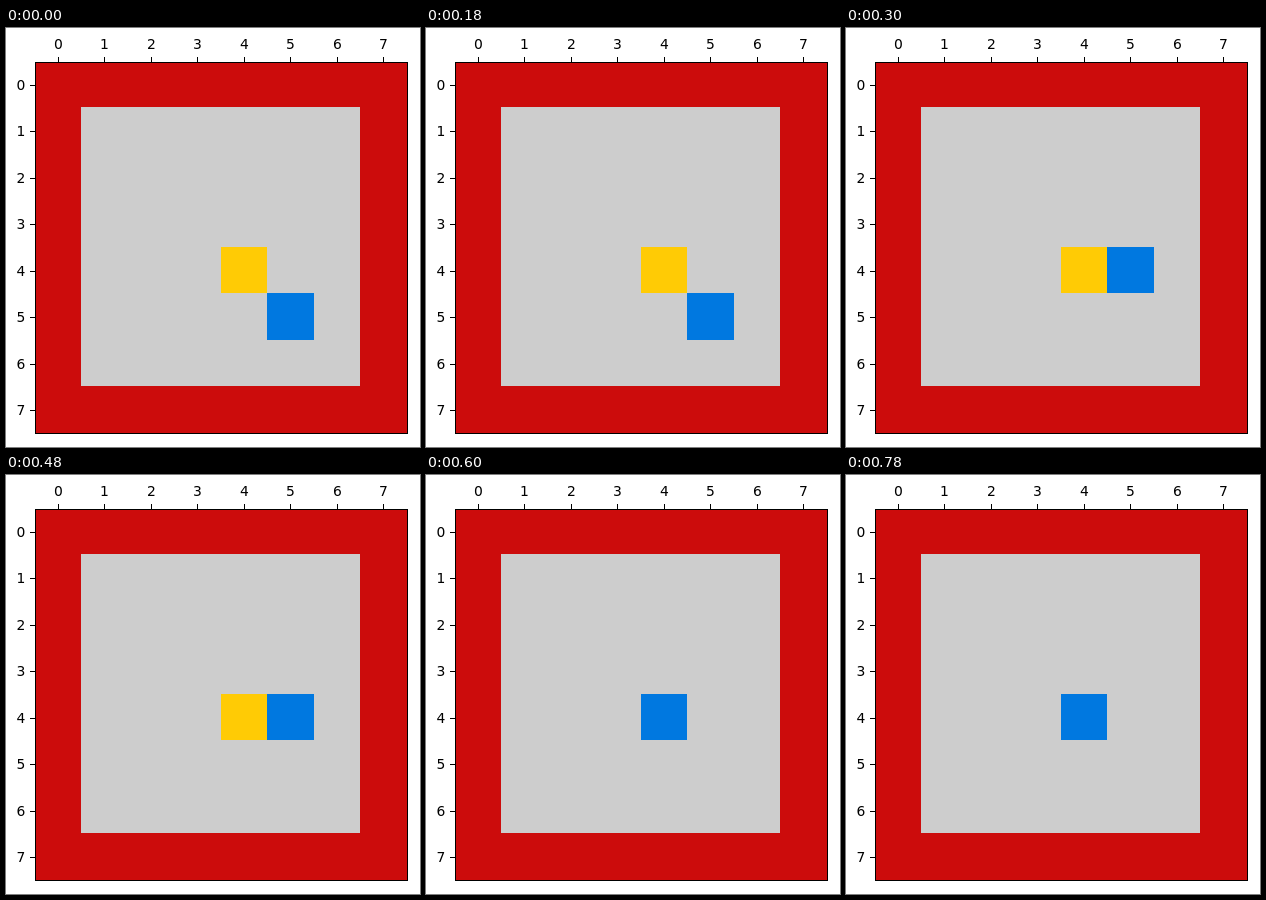
An HTML page with a canvas for the animation above (0.9 s loop, 414 by 419 pixels).

```html
<!DOCTYPE html>
<html>
<head>
<meta charset="utf-8">
<style>
  html, body { margin: 0; width: 100%; height: 100%; overflow: hidden; background: #fff; }
  canvas { display: block; }
</style>
</head>
<body>
<canvas id="stage" width="414" height="419"></canvas>
<script>
const ctx = document.getElementById('stage').getContext('2d');
const CELL = 46.5, LEFT = 28.5, TOP = 32.5, STEP = 300;
const RED = '#cc0c0c', GREY = '#cdcdcd', YELLOW = '#ffcb05', BLUE = '#0078e0';
const GOAL = [4, 4];
const PATH = [[5, 5], [5, 4], [4, 4]];

const edge = (start, n) => Math.round(start + n * CELL);

function cells(col, row, size, color) {
  const x = edge(LEFT, col), y = edge(TOP, row);
  ctx.fillStyle = color;
  ctx.fillRect(x, y, edge(LEFT, col + size) - x, edge(TOP, row + size) - y);
}

function axes() {
  ctx.fillStyle = '#fff';
  ctx.fillRect(0, 0, 414, 34);
  ctx.fillStyle = '#000';
  ctx.fillRect(29, 34, 373, 1);
  ctx.fillRect(29, 405, 373, 1);
  ctx.fillRect(29, 34, 1, 372);
  ctx.fillRect(401, 34, 1, 372);
  ctx.font = '13.89px "DejaVu Sans", sans-serif';
  for (let i = 0; i < 8; i++) {
    const x = Math.floor(52.25 + i * CELL), y = Math.round(56.75 + i * CELL);
    ctx.fillRect(x, 29, 1, 5);
    ctx.fillRect(24, y, 5, 1);
    ctx.textAlign = 'center';
    ctx.fillText(i, x + 0.5, 21);
    ctx.textAlign = 'right';
    ctx.fillText(i, 19.3, y + 5);
  }
}

function draw(now) {
  const [col, row] = PATH[Math.floor(now / STEP) % PATH.length];
  ctx.fillStyle = '#fff';
  ctx.fillRect(0, 0, 414, 419);
  cells(0, 0, 8, RED);
  cells(1, 1, 6, GREY);
  cells(...GOAL, 1, YELLOW);
  cells(col, row, 1, BLUE);
  axes();
  requestAnimationFrame(draw);
}
requestAnimationFrame(draw);
</script>
</body>
</html>
```
